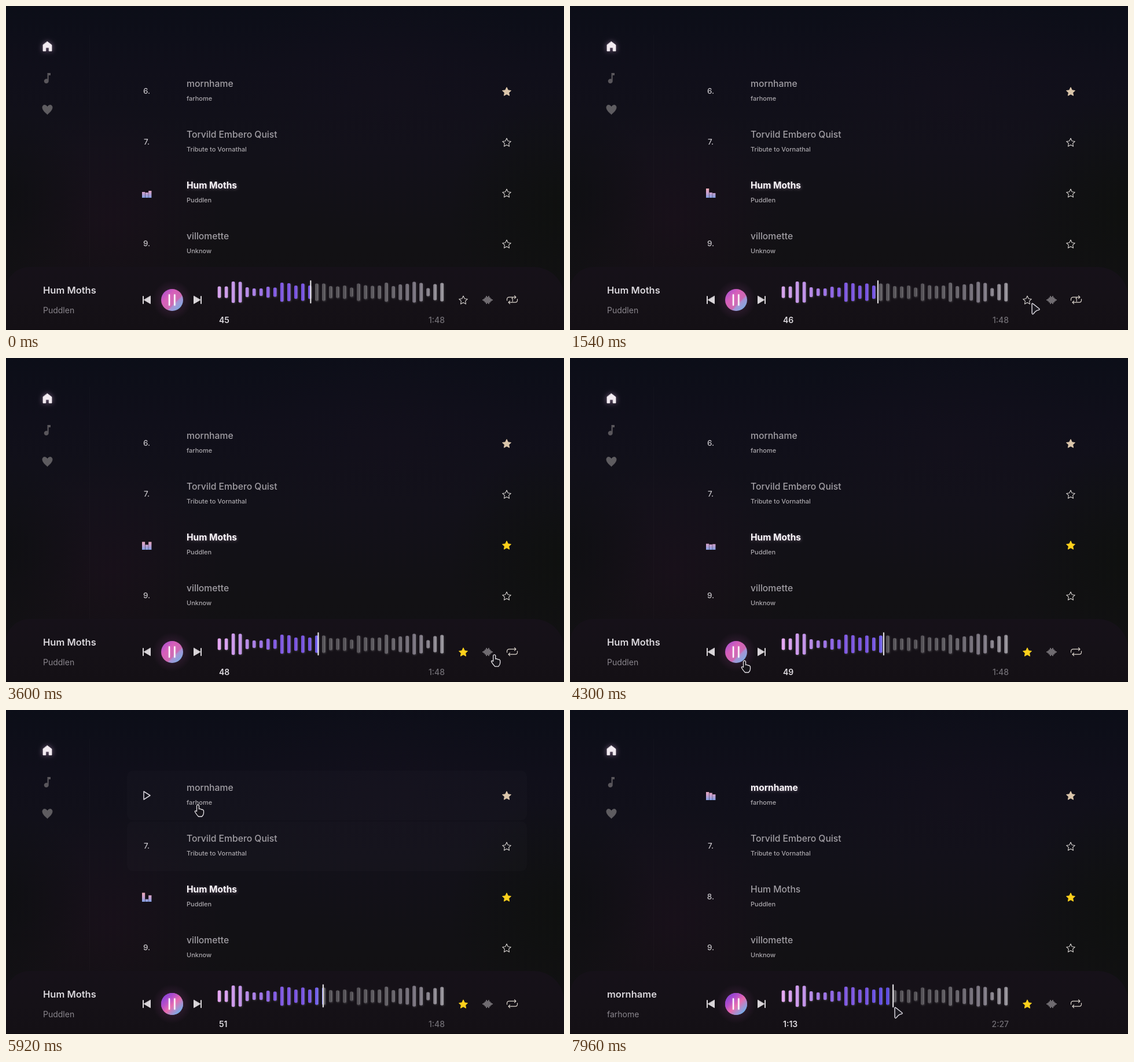
Recreate the animation shown at these times as an HTML page with a canvas. Size 964 by 561 pixels, loop 8 s.

```html
<!DOCTYPE html>
<html lang="en">
<head>
<meta charset="utf-8">
<title>Music player</title>
<style>
html, body { margin: 0; width: 100%; height: 100%; overflow: hidden; background: #111017; }
canvas { display: block; width: 964px; height: 561px; }
</style>
</head>
<body>
<canvas id="stage" width="964" height="561"></canvas>
<script>
const W = 964, H = 561, LOOP = 8000, STEP = 85.6;
const STAR_AT = 1850, REPEAT_AT = 2900, SWITCH_AT = 6200, SEEK_AT = 7400;
const ctx = document.getElementById('stage').getContext('2d');

const songs = [
  { name: 'mornhame', album: 'farhome', length: 147 },
  { name: 'Torvild Embero Quist', album: 'Tribute to Vornathal' },
  { name: 'Hum Moths', album: 'Puddlen', length: 108 },
  { name: 'villomette', album: 'Unknow' }
];
const wave = [20, 20, 37, 36, 17, 13, 13, 19, 16, 33, 31, 23, 30, 23, 30, 30, 21,
  20, 23, 16, 30, 24, 22, 23, 33, 21, 27, 29, 36, 32, 14, 28, 32];

// time, x, y of the pointer tip
const path = [
  [0, 768, 580], [80, 770, 575], [860, 781, 530], [1200, 848, 522], [1540, 798, 515],
  [1750, 791, 510], [1950, 791, 510], [2350, 874, 521], [2660, 875, 521],
  [2850, 874, 512], [3500, 872, 514], [4200, 301, 525], [4850, 301, 525],
  [5660, 330, 210], [5900, 331, 165], [6250, 331, 165], [6900, 388, 474],
  [7080, 388, 474], [7450, 558, 500], [7960, 561, 515], [8000, 561, 515]
];
// time and heights of the three equalizer bars
const levels = [
  [0, 10, 9, 12], [1540, 16, 9, 8], [2660, 10, 16, 8], [4300, 11, 10, 11],
  [5920, 16, 5, 12], [7020, 10, 7, 13], [7960, 13, 11, 8], [8000, 12, 10, 8]
];

const clamp = (v, a, b) => Math.min(b, Math.max(a, v));
const lerp = (a, b, u) => a + (b - a) * u;
const smooth = u => u * u * (3 - 2 * u);

function segment(keys, t) {
  let i = 0;
  while (i < keys.length - 2 && t >= keys[i + 1][0]) i++;
  const a = keys[i], b = keys[i + 1];
  return { a, b, u: clamp((t - a[0]) / (b[0] - a[0]), 0, 1) };
}

function pointer(t) {
  const { a, b, u } = segment(path, t), e = smooth(u);
  return { x: lerp(a[1], b[1], e), y: lerp(a[2], b[2], e) };
}

function hoveredRow(t) {
  const p = pointer(t);
  return p.x > 209 && p.x < 900 && p.y > 104 && p.y < 452 ? Math.floor((p.y - 104) / 88) : -1;
}

function gradient(x0, y0, x1, y1, stops) {
  const g = ctx.createLinearGradient(x0, y0, x1, y1);
  stops.forEach(([at, color]) => g.addColorStop(at, color));
  return g;
}

function glow(x, y, r, rgb, alpha) {
  const g = ctx.createRadialGradient(x, y, 0, x, y, r);
  g.addColorStop(0, `rgba(${rgb},${alpha})`);
  g.addColorStop(1, `rgba(${rgb},0)`);
  ctx.fillStyle = g;
  ctx.fillRect(x - r, y - r, r * 2, r * 2);
}

function text(s, x, y, size, weight, color, align = 'left') {
  ctx.font = `${weight} ${size}px Inter, "Open Sans", sans-serif`;
  ctx.textAlign = align;
  ctx.fillStyle = color;
  ctx.fillText(s, x, y);
}

function rounded(x, y, w, h, r, color) {
  ctx.beginPath();
  ctx.roundRect(x, y, w, h, r);
  ctx.fillStyle = color;
  ctx.fill();
}

function shape(d, x, y, fill, stroke, width = 1.3) {
  const p = new Path2D(d);
  ctx.save();
  ctx.translate(x, y);
  ctx.lineJoin = ctx.lineCap = 'round';
  if (fill) { ctx.fillStyle = fill; ctx.fill(p); }
  if (stroke) { ctx.strokeStyle = stroke; ctx.lineWidth = width; ctx.stroke(p); }
  ctx.restore();
}

function shadowed(color, blur, draw, dx = 0, dy = 0) {
  ctx.save();
  ctx.shadowColor = color;
  ctx.shadowBlur = blur;
  ctx.shadowOffsetX = dx;
  ctx.shadowOffsetY = dy;
  draw();
  ctx.restore();
}

function star(x, y, fill) {
  let d = '';
  for (let i = 0; i < 10; i++) {
    const r = i % 2 ? 3.8 : 7.7, a = i * Math.PI / 5 - Math.PI / 2;
    d += (i ? 'L' : 'M') + r * Math.cos(a) + ' ' + r * Math.sin(a);
  }
  shape(d + 'Z', x, y + .8, fill, fill || '#d9d5d2', 1.1);
}

function background() {
  ctx.fillStyle = gradient(0, 0, 0, H, [[0, '#0c0e18'], [.2, '#100f1a'], [.45, '#121119'], [.75, '#121114'], [1, '#121013']]);
  ctx.fillRect(0, 0, W, H);
  glow(180, 370, 200, '42,14,38', .25);
  glow(660, 160, 250, '22,17,30', .35);
  glow(0, 330, 150, '13,14,16', .6);
  glow(964, 350, 200, '14,16,13', .8);
  ctx.fillStyle = 'rgba(255,255,255,.018)';
  ctx.fillRect(144, 50, 1, 405);
}

function sidebar() {
  shadowed('rgba(240,190,240,.45)', 10, () =>
    shape('M0-8.3L7.5-2.500V8H2.700V2H-2.700V8H-7.500V-2.500Z', 71.5, 70, '#f3eef2', '#f3eef2', .8));
  shape('M0-9H5.500V-5H2.200V5A4 4 0 1 1 0 1.500Z', 71.5, 125, '#59565b');
  shape('M0 8C-12-1-9-8-5-8Q-2-8 0-5Q2-8 5-8C9-8 12-1 0 8Z', 71.5, 179.5, '#5e5c60', '#5e5c60', 1);
}

function equalizer(t, y) {
  const { a, b, u } = segment(levels, t);
  ctx.fillStyle = gradient(0, y - 16, 0, y, [[0, '#edaab4'], [.45, '#cda0cc'], [1, '#83a0e4']]);
  for (let i = 0; i < 3; i++) {
    const sway = 4 * Math.sin(2 * Math.PI * (i + 2) * u);
    const h = clamp(lerp(a[i + 1], b[i + 1], u) + sway, 4, 16);
    ctx.fillRect(235 + i * 5.6, y - h, 5.2, h);
  }
}

function rows(t) {
  const active = t < SWITCH_AT ? 2 : 0, over = hoveredRow(t);
  songs.forEach((song, i) => {
    const y = 104 + 88 * i;
    let hover = 0;
    for (let k = 0; k < 6; k++) hover += (hoveredRow(t - k * 50) === i) / 6;
    if (hover && i !== active) rounded(209, y + 1, 691, 86, 10, `rgba(255,255,235,${.022 * hover})`);
    if (i === active) equalizer(t, y + 52);
    else if (i === over) shape('M-5-7L6 0L-5 7Z', 243, y + 44, null, '#d7d4dc', 1.5);
    else text(i + 6 + '.', 243, y + 48, 13.5, 500, '#c6c3c8', 'center');
    if (i === active) {
      shadowed('rgba(255,220,255,.3)', 4, () => text(song.name, 312, y + 36, 15.5, 700, '#fbf8fb'), 1, 1);
    } else text(song.name, 312, y + 36, 15.7, 500, '#a19ea4');
    text(song.album, 312, y + 60, 11, 500, '#aaa7ac');
    const fill = i === 0 ? '#dbc6ab' : i === 2 && t >= STAR_AT ? '#fcd01c' : null;
    star(865, y + 44, fill);
  });
}

function skip(x, dir) {
  const light = '#d9d5d9';
  shape(`M${6.500 * dir}-6.500V6.500L${-4.500 * dir} 0Z`, x, 509, light, light, 1);
  rounded(x - 6 * dir - 1, 502, 2, 14, .8, light);
}

function transport(t) {
  skip(243, 1);
  skip(331, -1);
  glow(287, 509, 34, '190,85,180', .26);
  const u = smooth(clamp((t - 4700) / 700, 0, 1));
  const disc = (alpha, stops) => {
    ctx.globalAlpha = alpha;
    ctx.beginPath();
    ctx.arc(287, 509, 19, 0, Math.PI * 2);
    ctx.fillStyle = gradient(273, 495, 301, 523, stops);
    ctx.fill();
    ctx.globalAlpha = 1;
  };
  disc(1, [[0, '#b453cb'], [.3, '#d75fb9'], [.65, '#cc69b2'], [.72, '#a693d5'], [1, '#82a9e0']]);
  disc(u, [[0, '#8b43d7'], [.3, '#b950c8'], [.55, '#e86bae'], [.78, '#a990cf'], [1, '#70aee9']]);
  shadowed('rgba(255,255,255,.5)', 3, () => {
    rounded(281, 499, 2.2, 20, 1, '#fff');
    rounded(290.3, 499, 2.2, 20, 1, '#fff');
  });
}

function bars(stops, left, right) {
  ctx.save();
  ctx.beginPath();
  ctx.rect(left, 470, right - left, 50);
  ctx.clip();
  const fill = gradient(366, 0, 757, 0, stops);
  wave.forEach((h, i) => {
    const x = 365.7 + 12.02 * i, y = 495.5 - h / 2;
    shadowed('rgba(255,255,255,.18)', 3, () => rounded(x, y, 5.6, h, 2, fill), 1, 1);
    rounded(x + 3.9, y + 1, 1.5, h - 2, 1, 'rgba(255,255,255,.14)');
  });
  ctx.restore();
}

function progress(t) {
  const first = t < SWITCH_AT, song = songs[first ? 2 : 0];
  const sec = first ? 45.3 + t / 1000 : t < SEEK_AT ? 0 : 73 + (t - SEEK_AT) / 1000;
  const x = 361.5 + 393 * sec / song.length;
  bars([[0, '#bebcbe'], [.12, '#969398'], [.3, '#78757a'], [.45, '#59565b'], [.6, '#535055'],
    [.75, '#615e64'], [.87, '#7a7480'], [1, '#98959c']], x, 764);
  if (sec) {
    const pink = first && t < 3500 ? '#d5a2eb' : '#e6a7f3';
    bars([[0, pink], [.12, '#b98ce6'], [.25, '#8059e2'], [.36, '#7752e0'],
      [.42, first ? '#7657e7' : '#6650e6'], [.47, first ? '#6874f4' : '#5b4be0'], [1, '#5b4be0']], 360, x);
  }
  const half = sec ? 20 : 15;
  shadowed('rgba(255,255,255,.3)', 2, () => rounded(x - .9, 495 - half, 1.8, half * 2, 1, '#f5f2f5'));

  const clock = s => s < 60 ? String(Math.floor(s)) : Math.floor(s / 60) + ':' + String(Math.floor(s % 60)).padStart(2, '0');
  text(clock(sec), 368, 549, 14, 600, '#dedbe0');
  text(clock(song.length), 758, 549, 14, 500, '#716e74', 'right');
  text(song.name, 64, 498, 16.5, 600, '#d9d6db');
  text(song.album, 64, 532, 14, 400, '#89858c');
}

function options(t) {
  star(790, 509, t >= STAR_AT ? '#fcd01c' : null);
  [2, 5, 9, 14, 11, 14, 9, 5, 2].forEach((h, i) =>
    rounded(823.5 + i * 2, 509 - h / 2, 1, h, .5, '#c9c5c9'));
  shape('M-9 1V-.5Q-9-4.500-5-4.500H6.500M4-7L6.500-4.500L4-2M9-1V.5Q9 4.500 5 4.500H-6.500M-4 2L-6.500 4.500L-4 7',
    874.5, 508.7, null, '#ded7ce', 1.2);
  if (t < REPEAT_AT) text('1', 874.5, 512, 8.5, 600, '#ded7ce', 'center');
}

function panel() {
  ctx.beginPath();
  ctx.roundRect(0, 452, W, 130, [40, 52, 0, 0]);
  ctx.fillStyle = gradient(0, 452, 0, H, [[0, '#161119'], [.5, '#151117'], [1, '#141015']]);
  ctx.fill();
  ctx.fillStyle = '#0c0a0d';
  ctx.fillRect(0, 560, W, 1);
}

function cursor(t) {
  const { x, y } = pointer(t);
  const between = (a, b) => t >= a && t < b;
  if (between(6850, 7180)) {
    shape('M-6 7C-9 3-9 1-7 2L-5 4V-5Q-4-7-3-5V-1V-7Q-1.500-9 0-7V-1V-6Q1.500-8 3-6V0V-4Q5-6 6-4V5Q6 9 3 12H-3Z',
      x, y + 5, '#f5f5f5', '#1a181c', 1);
  } else if (between(1640, 2100) || between(2750, 3600) || between(4150, 6850)) {
    shape('M-2 10V2Q0-1 2 2V8Q5 7 6 9Q9 8 10 11V15Q10 18 7 21H1Q-2 18-5 13Q-6 10-2 12Z',
      x + .5, y - 1.5, '#17151b', '#e6e3e8', 1.3);
  } else {
    shape('M0 1.500Q0-1 2 .7L12.500 9Q14 10.500 12 11.300Q7 12 3 17.500Q.7 20 .2 17Z',
      x, y, '#1c1a21', '#d8d5dd', 1.5);
  }
}

function frame(now) {
  const t = Math.floor((now % LOOP + 5) / STEP) * STEP;
  background();
  sidebar();
  rows(t);
  panel();
  transport(t);
  progress(t);
  options(t);
  cursor(t);
}

const start = performance.now();
function tick() {
  frame(performance.now() - start);
  requestAnimationFrame(tick);
}
tick();
</script>
</body>
</html>
```
